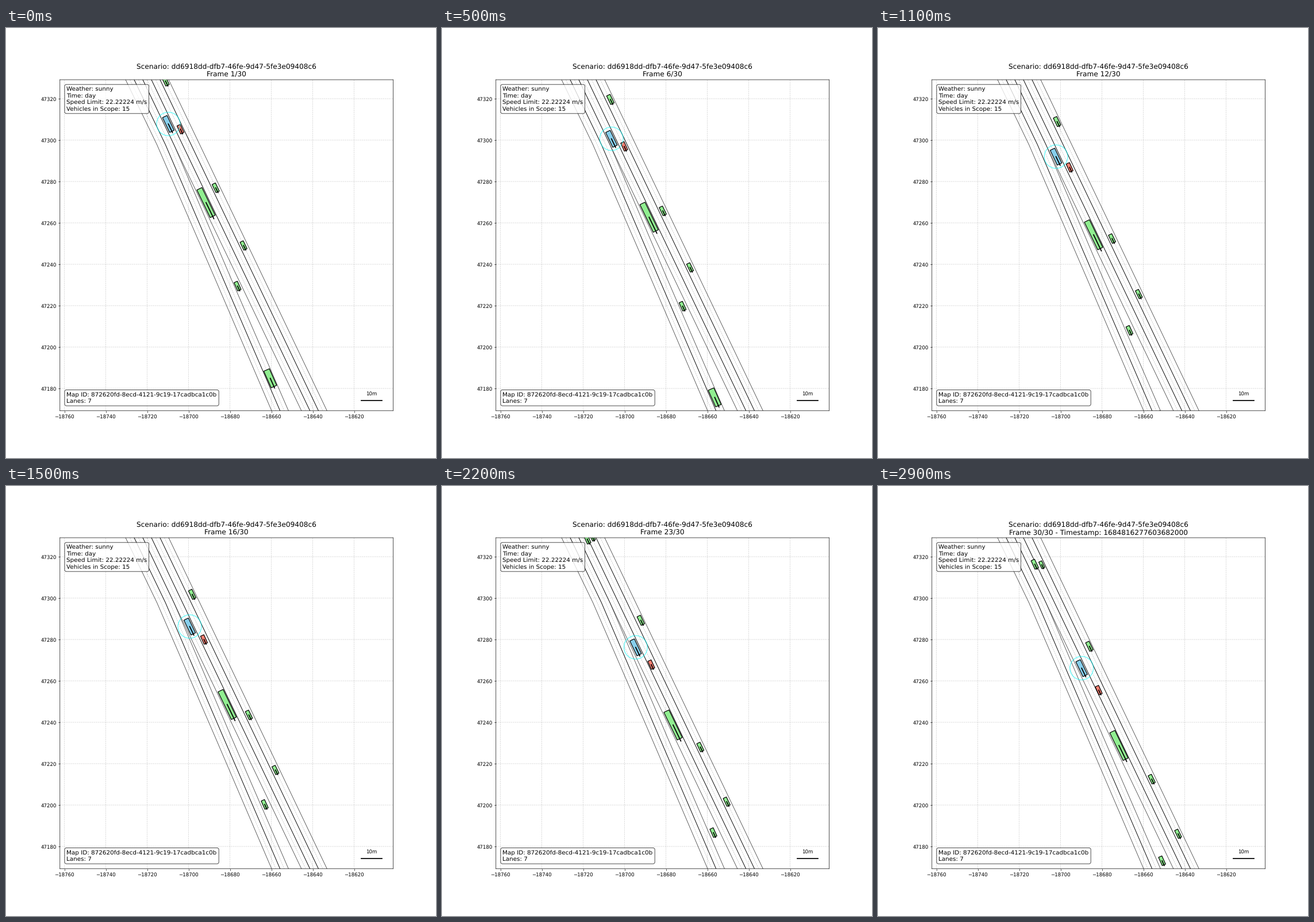
A matplotlib script that plays this animation: 748 px wide and 748 px high, repeating every 3000 ms.

```python
import numpy as np
import matplotlib.pyplot as plt
from matplotlib.animation import FuncAnimation
from matplotlib.patches import Circle, FancyBboxPatch, Polygon

STAGE = 748
SCALE = 3.6  # pixels per metre
FRAMES = 30
LEFT, RIGHT, TOP, BOTTOM = 93.8, 673.4, 90.0, 665.8

plt.rcParams["font.family"] = "DejaVu Sans"
plt.rcParams["text.hinting"] = "none"


def mx(px):
    """Stage pixel to map easting."""
    return -18760 + (np.asarray(px) - 101.5) / SCALE


def my(py):
    """Stage pixel, counted from the top, to map northing."""
    return 47320 - (np.asarray(py) - 123.0) / SCALE


fig, ax = plt.subplots(figsize=(12, 12), dpi=STAGE / 12, facecolor="white")
fig.subplots_adjust(left=LEFT / STAGE, right=RIGHT / STAGE,
                    bottom=1 - BOTTOM / STAGE, top=1 - TOP / STAGE)
ax.set_xlim(mx(LEFT), mx(RIGHT))
ax.set_ylim(my(BOTTOM), my(TOP))
ax.set_xticks(range(-18760, -18619, 20))
ax.set_yticks(range(47180, 47321, 20))
ax.ticklabel_format(useOffset=False, style="plain")
ax.grid(True, linestyle="--", alpha=0.6)
for line in (*ax.spines.values(), *ax.get_xgridlines(), *ax.get_ygridlines()):
    line.set_snap(False)


def label(x, y, text, size, ha="left"):
    return ax.text(mx(x), my(y), text, fontsize=size, ha=ha, va="baseline",
                   zorder=10)


def panel(x0, y0, x1, y1):
    ax.add_patch(FancyBboxPatch(
        (mx(x0), my(y1)), (x1 - x0) / SCALE, (y1 - y0) / SCALE,
        boxstyle=f"round,pad=0,rounding_size={3.1 / SCALE}",
        facecolor="white", edgecolor="black", linewidth=1, alpha=0.8,
        zorder=9))


# Road: each lane draws both of its edges, so shared edges look darker.
def draw_lanes(ys, first, spacing, count):
    first, spacing = np.array(first), np.array(spacing)
    for i in range(count):
        for k in (i, i + 1):
            ax.plot(mx(first + k * spacing), my(ys), color="black", lw=1,
                    alpha=0.7)
        ax.plot(mx(first + (i + 0.5) * spacing), my(ys), color="gray",
                lw=0.8, ls="--", alpha=0.5)


draw_lanes([80, 203, 437, 676], [203.2, 262.6, 364, 466.4],
           [15, 14.8, 14.0, 14.7], 2)
draw_lanes([80, 676], [233.2, 518.8], [15, 14.8], 3)


class Vehicle:
    """Moves down the stage as y0 + v*t + a*t^2 along a line of given slope."""

    def __init__(self, color, length, width, x0, y0, slope, v, a=0.0):
        self.length, self.width = length, width
        self.x0, self.y0, self.slope = x0, y0, slope
        self.v, self.a = v, a
        self.ahead = np.array([slope, 1.0]) / np.hypot(slope, 1.0)
        self.side = np.array([self.ahead[1], -self.ahead[0]])
        self.body = ax.add_patch(Polygon(
            np.zeros((4, 2)), closed=True, facecolor=color,
            edgecolor="black", linewidth=1.4, zorder=5))
        self.heading, = ax.plot([], [], color="black", lw=2, zorder=6)

    def place(self, t):
        dy = self.v * t + self.a * t * t
        center = np.array([self.x0 + self.slope * dy, self.y0 + dy])
        along = self.ahead * self.length / 2
        across = self.side * self.width / 2
        corners = np.array([center + i * along + j * across
                            for i, j in ((1, 1), (1, -1), (-1, -1), (-1, 1))])
        self.body.set_xy(np.column_stack([mx(corners[:, 0]),
                                          my(corners[:, 1])]))
        tip = center + self.ahead * self.length * 0.58
        self.heading.set_data(mx([center[0], tip[0]]), my([center[1], tip[1]]))
        return center


GREEN = "lightgreen"
ego = Vehicle("skyblue", 28.6, 8.8, 282.4, 166.9, 0.479, 5.17)
others = [
    Vehicle("salmon", 15.4, 6.4, 303.5, 176.0, 0.4495, 5.95, 0.0078),
    Vehicle(GREEN, 53.4, 9.8, 348.0, 303.7, 0.482, 5.09),
    Vehicle(GREEN, 31.6, 10.6, 459.7, 609.3, 0.443, 6.65),
    Vehicle(GREEN, 15.8, 6.4, 364.8, 278.0, 0.48, 8.04, -0.0015),
    Vehicle(GREEN, 15.3, 6.2, 413.2, 378.3, 0.48, 7.6, 0.0075),
    Vehicle(GREEN, 15.8, 6.4, 402.8, 448.9, 0.45, 7.0),
    Vehicle(GREEN, 16.6, 6.6, 277.4, 92.2, 0.484, 6.4, 0.0012),
    Vehicle(GREEN, 16.4, 6.6, 189.4, -45.2, 0.46, 6.25),
    Vehicle(GREEN, 12.8, 5.6, 188.7, -62.2, 0.483, 6.87),
]
ring = ax.add_patch(Circle((0, 0), 20.4 / SCALE, fill=False, edgecolor="cyan",
                           linewidth=1.5, alpha=0.6, zorder=7))

# Scale bar
ax.plot(mx([617.6, 653.6]), my([647.8, 647.8]), color="black", lw=2)
label(635.6, 639, "10m", 10, "center")

# Information panels
panel(102, 98.2, 248.6, 148.8)
for row, text in enumerate(("Weather: sunny", "Time: day",
                            "Speed Limit: 22.22224 m/s",
                            "Vehicles in Scope: 15")):
    label(105.1, 109.3 + 11.5 * row, text, 12)

panel(102, 629.5, 370.2, 657.2)
label(105.1, 640.8, "Map ID: 872620fd-8ecd-4121-9c19-17cadbca1c0b", 12)
label(105.1, 652.3, "Lanes: 7", 12)

# Title
label(383.3, 70.9, "Scenario: dd6918dd-dfb7-46fe-9d47-5fe3e09408c6", 14,
      "center")
counter = label(383.3, 84.6, "", 14, "center")


def draw(n):
    x, y = ego.place(n)
    ring.center = (mx(x), my(y))
    for vehicle in others:
        vehicle.place(n)
    text = f"Frame {n + 1}/{FRAMES}"
    if n == FRAMES - 1:
        text += " - Timestamp: 1684816277603682000"
    counter.set_text(text)
    return []


anim = FuncAnimation(fig, draw, frames=FRAMES, interval=100, repeat=True,
                     repeat_delay=0, blit=False)
plt.show()
```
